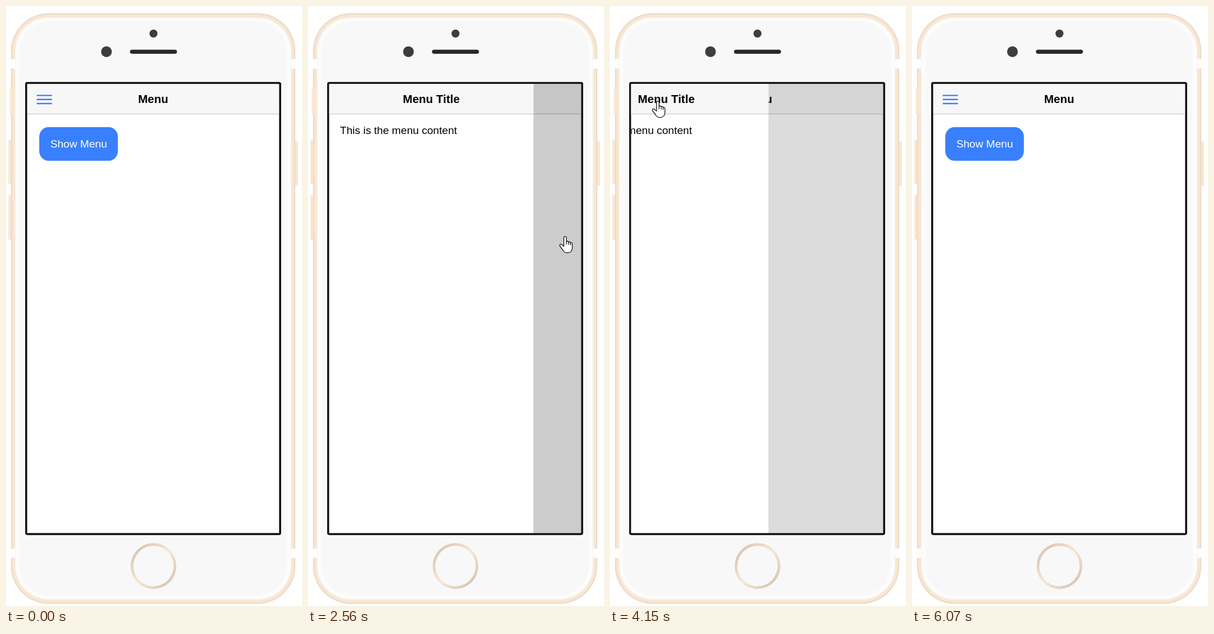
These frames come from a looping animation (526 by 1064 pixels, 6.47 s). An HTML page:

```html
<!DOCTYPE html>
<html lang="en">
<head>
<meta charset="utf-8">
<title>Side menu</title>
<style>
  html, body { margin: 0; width: 100%; height: 100%; overflow: hidden; background: #fff; }
  #stage { position: relative; width: 526px; height: 1064px; overflow: hidden; font: 16px "Liberation Sans", Arial, sans-serif; color: #000; }
  #stage div { position: absolute; box-sizing: border-box; }

  #phone { left: 9px; top: 13.3px; width: 423px; height: 877px; transform: scale(1.1938); transform-origin: 0 0; border-radius: 56px; background: #f9e7d3; box-shadow: inset 0 0 3px rgba(0, 0, 0, .2); }
  #phone .side { width: 4px; height: 66px; background: #f9e7d3; }
  #phone .band { left: 0; width: 100%; height: 14px; background: #fff; }
  .face { inset: 6px; border-radius: 50px; background: #f8f8f8; }
  .rim { inset: 8px; border-radius: 48px; box-shadow: inset 0 0 3px #fff, inset 0 0 6px 3px #fff; }
  .dot { border-radius: 50%; background: #3c3d3d; }
  .speaker { left: 176.5px; top: 54px; width: 70px; height: 6px; border-radius: 6px; background: #292728; }
  .home { left: 177.5px; top: 787px; width: 68px; height: 68px; border-radius: 50%; background: linear-gradient(135deg, #cebba9 0%, #f9e7d3 50%, #cebba9 100%); }
  .home div { inset: 4px; border-radius: 50%; background: #f8f8f8; }

  .frame { left: 21px; top: 102px; width: 381px; height: 673px; border-radius: 3px; background: #111; }
  #screen { left: 24px; top: 105px; width: 375px; height: 667px; overflow: hidden; background: #fff; }
  .bar { left: 0; top: 0; width: 100%; height: 44.6px; line-height: 44px; text-align: center; font-size: 17.2px; font-weight: bold; background: #f7f7f7; border-bottom: .8px solid #c8c7cc; }
  .line { left: 13.5px; width: 23px; height: 1.7px; border-radius: 1px; background: #3880ff; }
  #button { left: 18.4px; top: 64.3px; width: 116.5px; height: 49.4px; line-height: 49.4px; border-radius: 14px; text-align: center; white-space: nowrap; color: #fff; }
  #backdrop { inset: 0; background: #000; }
  #menu { left: 0; top: 0; width: 304px; height: 100%; background: #fff; }
  #menu .text { left: 16px; top: 60px; white-space: nowrap; }

  #pointer { position: absolute; left: 0; top: 0; overflow: visible; }
  #pointer path { fill: #fff; stroke: #111; stroke-width: 1.3; stroke-linejoin: round; }
</style>
</head>
<body>
<div id="stage">
  <div id="phone">
    <div class="side" style="left:-2px;top:110px;height:40px"></div>
    <div class="side" style="left:-4px;top:188px"></div>
    <div class="side" style="left:-4px;top:270px"></div>
    <div class="side" style="left:423px;top:190px"></div>
    <div class="band" style="top:68px"></div>
    <div class="band" style="top:795px"></div>
    <div class="face"></div>
    <div class="rim"></div>
    <div class="dot" style="left:205.5px;top:24px;width:12px;height:12px"></div>
    <div class="dot" style="left:134px;top:49px;width:16px;height:16px"></div>
    <div class="speaker"></div>
    <div class="home"><div></div></div>
    <div class="frame"></div>
    <div id="screen">
      <div class="bar">Menu
        <div class="line" style="top:16px"></div>
        <div class="line" style="top:22px"></div>
        <div class="line" style="top:28px"></div>
      </div>
      <div id="button">Show Menu</div>
      <div id="backdrop"></div>
      <div id="menu">
        <div class="bar">Menu Title</div>
        <div class="text">This is the menu content</div>
      </div>
    </div>
  </div>
  <svg id="pointer" width="1" height="1">
    <path id="arrow" d="M.6 .6V22.5L5.6 17.9L9 25.6L12.2 24.2L9 16.7H16Z"/>
    <g id="hand">
      <path d="M-2.4 1.2Q0 -1.8 2.2 1.2V8.6Q4.6 7 6 9.6Q8.5 8.2 9.4 10.8Q12.6 10 12.6 13V20C12.4 25.5 9 28.6 4.5 28.6H2.5C-.5 28.6 -2.2 26.8 -4 24L-9 17.2C-10.8 14.4 -8 12.2 -5.6 14.3L-2.4 17.4Z"/>
      <path d="M2.2 8.6V14M6 9.6V14.4M9.4 10.8V15" style="fill:none"/>
    </g>
    <circle id="press" r="19.5" fill="#ff0" fill-opacity=".5"/>
  </svg>
</div>
<script>
const LOOP = 6470, STEP = 70, SLIDE = 400;
const byId = id => document.getElementById(id);
const [button, backdrop, menu, pointer, arrow, hand, press] =
  ['button', 'backdrop', 'menu', 'pointer', 'arrow', 'hand', 'press'].map(byId);

const starts = [0, 100, 430, 1130, 1450, 2140, 2910, 3590, 4680, 5370];

// time, x, y of the pointer tip
const path = [
  [100, 495, 975], [240, 430, 812], [370, 430, 812], [1060, 112, 267],
  [1130, 119, 246], [2070, 119, 246], [2560, 457, 409], [2770, 449, 422],
  [3390, 449, 422], [3940, 85, 169], [4630, 85, 169], [5100, 436, 470],
  [5310, 431, 477], [5590, 431, 477], [5900, 492, 900], [6000, 487, 1062]
];
const presses = [[1450, 1585], [2910, 3040], [3940, 4070], [5370, 5505]];
const hands = [[1130, 1790], [2430, 3460], [3870, 4285], [4980, 5780]];
const toggles = [[1580, 1], [3034, 0], [4068, 1], [5500, 0]];

const within = (t, spans) => spans.some(([a, b]) => t >= a && t < b);
const show = (node, on) => { node.style.display = on ? '' : 'none'; };

function snap(t) {
  const start = starts.filter(s => s <= t).pop();
  return start + Math.floor((t - start) / STEP) * STEP;
}

// cubic-bezier(.32, .72, 0, 1)
function ease(x) {
  if (x >= 1) return 1;
  const bezier = (s, a, b) => 3 * a * s * (1 - s) ** 2 + 3 * b * s * s * (1 - s) + s ** 3;
  let low = 0, high = 1;
  for (let i = 0; i < 24; i++) {
    const mid = (low + high) / 2;
    if (bezier(mid, .32, 0) < x) low = mid; else high = mid;
  }
  return bezier(low, .72, 1);
}

function openness(t) {
  const last = toggles.filter(([at]) => at <= t).pop();
  if (!last) return 0;
  const p = ease((t - last[0]) / SLIDE);
  return last[1] ? p : 1 - p;
}

function tip(t) {
  const i = path.findIndex(key => key[0] > t);
  if (i < 0) return path[path.length - 1].slice(1);
  if (i === 0) return path[0].slice(1);
  const [t0, x0, y0] = path[i - 1], [t1, x1, y1] = path[i];
  const u = (t - t0) / (t1 - t0);
  const k = t1 - t0 > 300 ? u * u * (3 - 2 * u) : u * (2 - u);
  return [x0 + (x1 - x0) * k, y0 + (y1 - y0) * k];
}

function draw(time) {
  const t = snap(time);
  const open = openness(t);
  menu.style.transform = `translateX(${-304 * (1 - open)}px)`;
  show(menu, open > 0);
  backdrop.style.opacity = open > 0 ? .01 + .19 * open : 0;
  button.style.background = within(t, [hands[0]]) ? '#4c8dff' : '#3880ff';

  const [x, y] = tip(t);
  const isHand = within(t, hands);
  pointer.style.transform = `translate(${x}px, ${y}px)`;
  show(pointer, t >= 100 && t < 6070);
  show(hand, isHand);
  show(arrow, !isHand);
  show(press, within(t, presses));
}

function tick() {
  draw(performance.now() % LOOP);
  requestAnimationFrame(tick);
}
tick();
</script>
</body>
</html>
```
